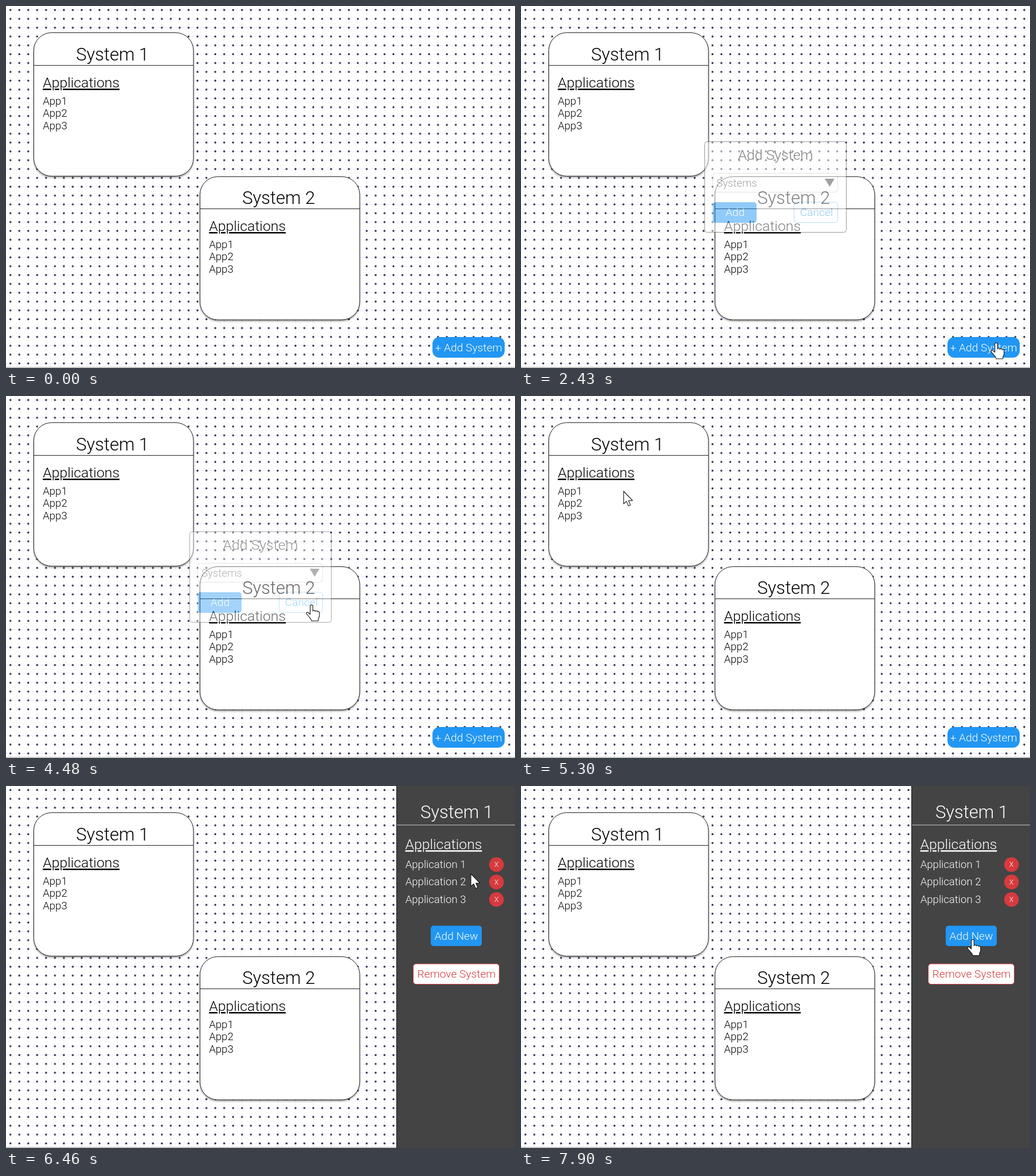
Recreate the animation shown at these times as an HTML page. Size 888 px wide and 631 px high, loop 8000 ms.

```html
<!DOCTYPE html>
<html lang="en">
<head>
<meta charset="utf-8">
<title>System board</title>
<style>
  html, body { margin: 0; width: 100%; height: 100%; overflow: hidden; background: #fff; }
  svg { display: block; width: 888px; height: 631px; font-family: Roboto, sans-serif; font-weight: 300; }
  .card { fill: #fff; stroke: #222; filter: drop-shadow(0 2px 1.5px rgba(0,0,0,.4)); }
  .h1 { font-size: 31px; }
  .h2 { font-size: 24.8px; }
  .item { font-size: 18.6px; }
  .btn { font-size: 19.2px; text-anchor: middle; }
  .u { text-decoration: underline; text-decoration-thickness: 1.3px; }
  .mid { text-anchor: middle; }
  .light { fill: #fff; }
  .blue { fill: #2196f3; }
  .pointer { fill: #fff; stroke: #111; stroke-width: 1.1; stroke-linejoin: round; }
</style>
</head>
<body>
<svg viewBox="0 0 888 631">
  <defs>
    <pattern id="dots" x="-.1" y="-.7" width="15.54" height="15.4" patternUnits="userSpaceOnUse">
      <circle cx="7.8" cy="7.7" r="1.65" fill="#11113f"/>
    </pattern>
    <pattern id="lines" x="-.1" y="-.7" width="31.08" height="30.8" patternUnits="userSpaceOnUse">
      <path d="M7.8 0V30.8M0 7.7H31.08" stroke="#f0f0f3" fill="none"/>
    </pattern>
  </defs>

  <rect width="888" height="631" fill="url(#lines)"/>
  <rect width="888" height="631" fill="url(#dots)"/>
  <path d="M0 630H888" stroke="#b5b5b5" stroke-width="1.4"/>

  <g id="cards"></g>

  <rect class="blue" x="744" y="577" width="126" height="36" rx="12"/>
  <text class="btn light" x="807" y="601.5">+ Add System</text>

  <g id="dialog">
    <rect x="320.5" y="236.5" width="247" height="158" rx="4" fill="#fff" stroke="#333"/>
    <text class="h2 mid" x="444" y="268">Add System</text>
    <rect x="334.5" y="291.5" width="218" height="33" rx="6" fill="#fff" stroke="#c4c4c4"/>
    <text class="item" x="341" y="315" fill="#444">Systems</text>
    <path d="M530 301H547L538.5 315Z" fill="#444"/>
    <rect class="blue" x="334.5" y="342" width="76.5" height="36" rx="5"/>
    <text class="btn light" x="373.5" y="365.5">Add</text>
    <rect x="476.5" y="342" width="76" height="35.5" rx="5" fill="#fff" stroke="#6fb9f6"/>
    <text class="btn blue" x="515.5" y="365.5">Cancel</text>
  </g>

  <g id="panel">
    <rect x="681" width="208" height="631" fill="#444"/>
    <path d="M681.5 0V631" stroke="#111"/>
    <path d="M682 68H888" stroke="#ccc"/>
    <g class="light">
      <text class="h1 mid" x="786.5" y="56">System 1</text>
      <text class="h2 u" x="696.5" y="110">Applications</text>
      <g id="apps"></g>
    </g>
    <rect class="blue" x="741" y="243.5" width="89" height="35.5" rx="5"/>
    <text class="btn light" x="785.5" y="268">Add New</text>
    <rect x="710.5" y="310" width="150" height="35.5" rx="5" fill="#fff" stroke="#d63a3e"/>
    <text class="btn" x="786" y="334" fill="#d63a3e">Remove System</text>
  </g>

  <g id="cursor" class="pointer">
    <path id="arrow" d="M0 0V22L5 17.6 8.4 25.6 12 24.1 8.6 16.2H15.5Z"/>
    <path id="hand" d="M-2.3 16.5V2.3A2.3 2.3 0 0 1 2.3 2.3V11c0-2 4-2 4 .5 .5-2 4-1.5 4 .8 .8-1.5 3.5-.8 3.5 1.5V19c0 3-2 4-2 6V28H0c0-3-3-5-5-8L-8.5 16c-1.5-2.5 1.5-4 3.2-2.2Z"/>
  </g>
</svg>
<script>
const LOOP = 8000;
const $ = id => document.getElementById(id);

// The header line and the bottom edge sit on whole pixels.
function card(n, x, top, line, bottom) {
  const apps = [1, 2, 3].map(i =>
    `<text class="item" x="${x + 15.7}" y="${line + 46.3 + i * 21.7}">App${i}</text>`).join("");
  return `<rect class="card" x="${x}" y="${top}" width="278.5" height="${bottom - top}" rx="31"/>
    <path d="M${x} ${line}h278.5" stroke="#222"/>
    <text class="h1 mid" x="${x + 137.2}" y="${line - 8.5}">System ${n}</text>
    <text class="h2 u" x="${x + 15.7}" y="${line + 38.5}">Applications</text>${apps}`;
}
$("cards").innerHTML = card(1, 48.5, 46.5, 103.5, 296.5) + card(2, 338.5, 297.5, 353.5, 547);

$("apps").innerHTML = [1, 2, 3].map(n => {
  const y = 106.6 + n * 30.4;
  return `<text class="item" x="696.7" y="${y + 6}">Application ${n}</text>
    <circle cx="855.7" cy="${y}" r="12.8" fill="#d63a3e"/>
    <text class="mid" x="855.7" y="${y + 4.3}" font-size="12.5">X</text>`;
}).join("");

// Cursor moves: start, end, x, y
const moves = [
  [330, 470, 685, 85],
  [670, 930, 316, 150],
  [930, 1600, 762, 492],
  [1680, 2150, 829, 587],
  [2790, 3400, 486, 292],
  [3460, 3530, 456, 298],
  [3600, 4200, 533, 364],
  [4740, 5250, 179, 166],
  [5400, 5500, 197, 166],
  [5570, 6130, 811, 153],
  [6520, 7210, 820, 219],
  [7280, 7900, 788, 267.5]
];

const ramp = (t, from, to) => Math.min(1, Math.max(0, (t - from) / (to - from)));
const smooth = k => k * k * (3 - 2 * k);
const inside = (x, y, left, top, right, bottom) =>
  x >= left && x <= right && y >= top && y <= bottom;
const show = (id, on) => $(id).setAttribute("visibility", on ? "visible" : "hidden");
const shift = (id, x, y) => $(id).setAttribute("transform", `translate(${x} ${y})`);

function cursorAt(t) {
  let x = 842, y = 598;
  for (const [from, to, toX, toY] of moves) {
    const k = smooth(ramp(t, from, to));
    x += (toX - x) * k;
    y += (toY - y) * k;
  }
  return [x, y];
}

function draw(t) {
  const [x, y] = cursorAt(t);
  const hand = inside(x, y, 744, 577, 870, 613)
    || inside(x, y, 741, 243, 830, 279)
    || t > 2290 && inside(x, y, 334, 296, 553, 378);
  shift("cursor", x, y);
  show("arrow", t >= 330 && !hand);
  show("hand", t >= 330 && hand);

  const fade = ramp(t, 2290, 2570) - ramp(t, 4340, 4580);
  $("dialog").setAttribute("opacity", fade);
  show("dialog", fade > 0);

  const slide = ramp(t, 5312, 5712);
  shift("panel", 207 * (1 - slide) ** 3, 0);
  show("panel", slide > 0);
}

const start = performance.now();
function tick() {
  draw((performance.now() - start) % LOOP);
  requestAnimationFrame(tick);
}
tick();
</script>
</body>
</html>
```
